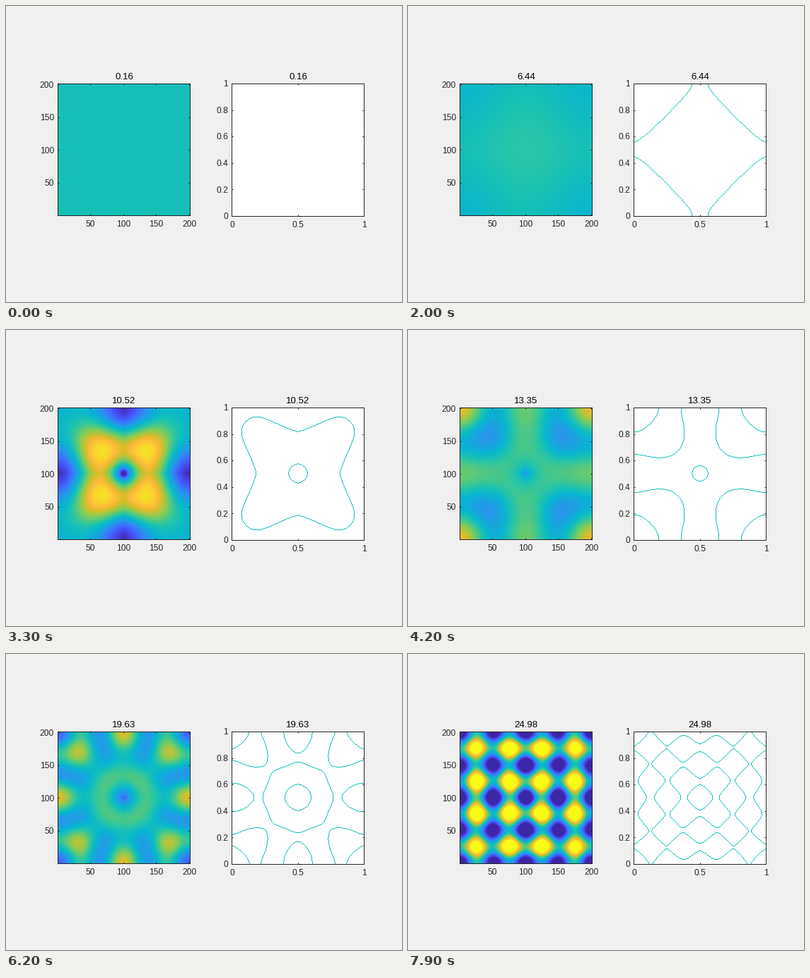
A matplotlib script for the animation above (8000 ms loop, 560 by 420 pixels).

```python
import numpy as np
import matplotlib.pyplot as plt
from matplotlib.animation import FuncAnimation
from matplotlib.colors import LinearSegmentedColormap, ListedColormap

W, H, DPI = 560, 420, 100
FRAMES, INTERVAL = 80, 100
INK, TEAL = "#262626", "#14bfb9"
PX = 72 / DPI

plt.rcParams["font.family"] = "Liberation Sans"

STOPS = [
    (0, "#3e26a8"), (1 / 9, "#4747eb"), (2 / 9, "#3e6fff"), (3 / 9, "#2797eb"),
    (4 / 9, "#08b5d0"), (0.5, "#14bfb9"), (5 / 9, "#31c69f"), (6 / 9, "#81cc59"),
    (7 / 9, "#dcbd29"), (0.84, "#feba3c"), (8 / 9, "#fccf30"), (0.94, "#f5e327"),
    (1, "#f9fb15"),
]
CMAP = LinearSegmentedColormap.from_list("field", STOPS, N=256)

# Standing waves of a square plate driven at its centre.
SIZE, MODES = 201, 50
order = np.arange(MODES)
LEVELS = 4 * (order[:, None] ** 2 + order ** 2)


def waves(points):
    return np.cos(2 * np.pi * np.outer(order, np.linspace(0, 1, points) - 0.5))


# Screen boxes as left, top, right, bottom; outlines lie on whole pixels.
FIELD_BOX = (73, 110, 260, 297)
NODE_BOX = (319, 110, 506, 298)
NODE_W, NODE_H = 187, 188
FIELD_WAVES = waves(SIZE)
NODE_X, NODE_Y = waves(NODE_W + 1), waves(NODE_H + 1)


def wave_number(i):
    return 0.05 + 0.1 * i


def mode_gain(i):
    return 1 / (wave_number(i) ** 2 - LEVELS)


def field(i):
    gain = mode_gain(i)
    damping = np.interp(i, [20, 33, 42, 54, 62, 79],
                        [2.3, 2.7, 3.2, 3.3, 1.55, 0.52])
    return FIELD_WAVES.T @ gain @ FIELD_WAVES / (damping * np.sum(gain ** 2))


def nodal_pixels(i):
    """One-pixel zero line: the nearer pixel of each pair with a sign change."""
    z = NODE_Y.T @ mode_gain(i) @ NODE_X
    slopes = np.abs(np.gradient(z))
    mask = np.zeros(z.shape, bool)
    for axis in (0, 1):
        steep = slopes[axis] >= slopes[1 - axis]
        zt, st, mt = (np.moveaxis(a, axis, 0) for a in (z, steep, mask))
        a, b = zt[:-1], zt[1:]
        cross = (a < 0) != (b < 0)
        near = np.abs(a) <= np.abs(b)
        mt[:-1] |= cross & near & st[:-1]
        mt[1:] |= cross & ~near & st[1:]
    return np.where(mask, 1.0, np.nan)


fig = plt.figure(figsize=(W / DPI, H / DPI), dpi=DPI, facecolor="#f0f0f0")


def label(x, y, text, size=12, ha="center", color=INK):
    return fig.text(x / W, 1 - y / H, text, fontsize=size * PX, ha=ha,
                    va="baseline", color=color)


def panel(box, lim, xticks, yticks):
    left, top, right, bottom = box
    ax = fig.add_axes([left / W, 1 - bottom / H,
                       (right - left) / W, (bottom - top) / H])
    ax.set(xlim=lim, ylim=lim, xticks=xticks, yticks=yticks)
    ax.tick_params(direction="in", length=2.2 * PX, width=PX, color=INK,
                   top=True, right=True, labelbottom=False, labelleft=False)
    for spine in ax.spines.values():
        spine.set(linewidth=PX, color=INK)
    span = lim[1] - lim[0]
    for t in xticks:
        x = left + 0.5 + (t - lim[0]) / span * (right - left)
        label(x, bottom + 16, f"{t:g}")
    for t in yticks:
        y = bottom - (t - lim[0]) / span * (bottom - top)
        label(left - 5, y + 4.2, f"{t:g}", ha="right")
    title = label((left + right) / 2 + 0.5, 104, "", 13.3, color="black")
    return ax, title


steps = [50, 100, 150, 200]
field_ax, field_title = panel(FIELD_BOX, (0.5, SIZE + 0.5), steps, steps)
node_ax, node_title = panel(NODE_BOX, (0, 1), [0, 0.5, 1],
                            [0, 0.2, 0.4, 0.6, 0.8, 1])

field_image = field_ax.imshow(
    np.zeros((SIZE, SIZE)), cmap=CMAP, vmin=-1, vmax=1, origin="lower",
    aspect="auto", interpolation="bilinear",
    extent=(0.5, SIZE + 0.5, 0.5, SIZE + 0.5))
node_image = node_ax.imshow(
    nodal_pixels(0), cmap=ListedColormap([TEAL]), vmin=0, vmax=1,
    origin="lower", aspect="auto", interpolation="nearest",
    extent=(0, 1 + 1 / NODE_W, 0, 1 + 1 / NODE_H))


def draw(i):
    field_image.set_data(field(i))
    node_image.set_data(nodal_pixels(i))
    text = f"{np.pi * wave_number(i):.2f}"
    field_title.set_text(text)
    node_title.set_text(text)
    return []


anim = FuncAnimation(fig, draw, frames=FRAMES, interval=INTERVAL,
                     init_func=lambda: draw(0), repeat=True, repeat_delay=0)
plt.show()
```
